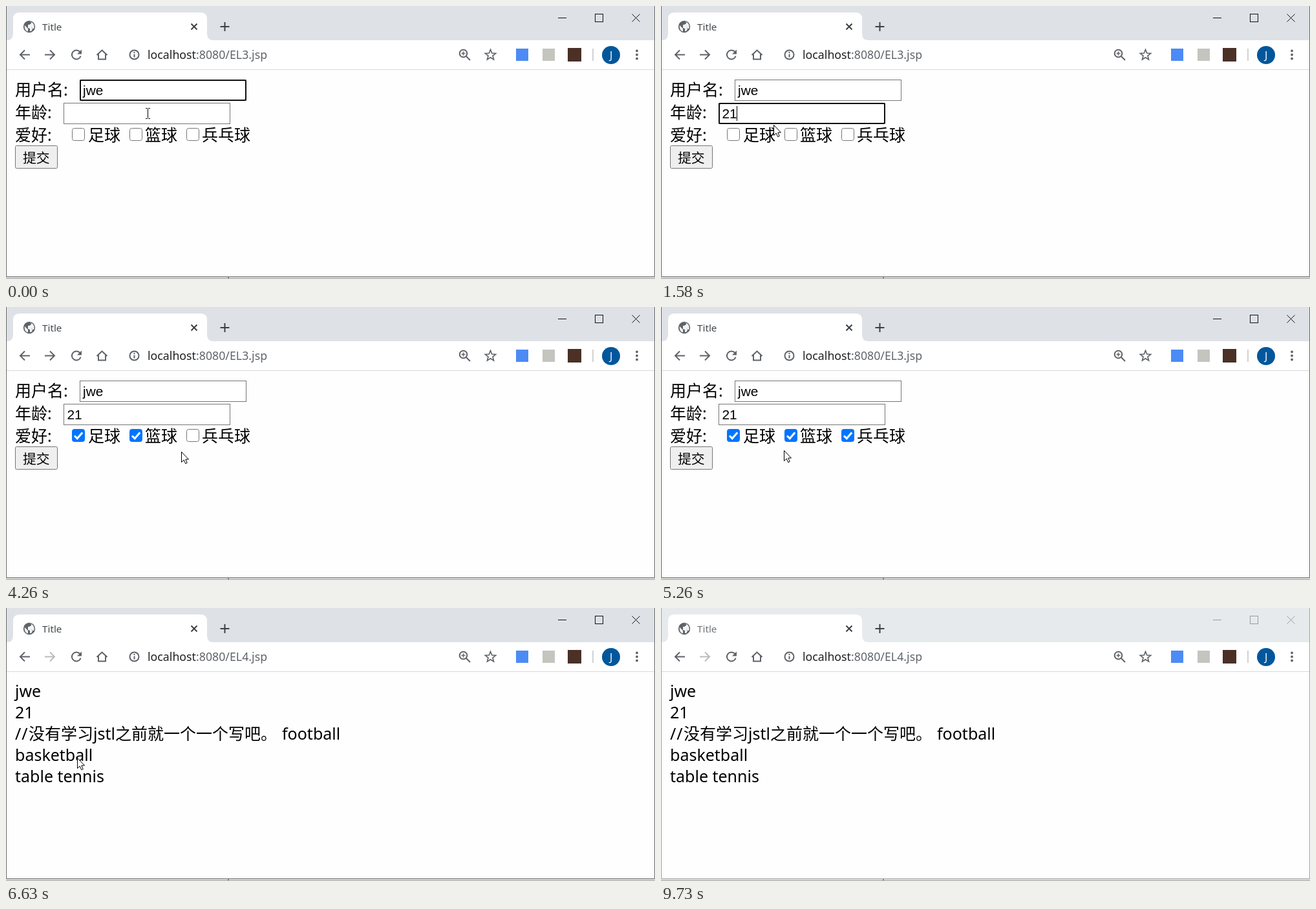
An HTML page for the animation above (9830 ms loop, 1004 by 423 pixels).

```html
<!DOCTYPE html>
<html lang="zh-CN">
<head>
<meta charset="utf-8">
<title>Form demo</title>
<style>
html, body { margin: 0; width: 100%; height: 100%; overflow: hidden; background: #fff; }
svg { display: block; width: 1004px; height: 423px; }
text { font-family: "Noto Sans", "Noto Sans CJK SC", "Noto Sans CJK", sans-serif; white-space: pre; }
.page text { font-size: 25px; fill: #000; }
.page .field text { font: 20.83px "Liberation Sans", Arial, sans-serif; }
.field rect { fill: #fff; stroke: #767676; }
.field .ring { fill: none; stroke: #101010; stroke-width: 2; }
.box rect { fill: #fff; stroke: #767676; }
.box.hover rect { stroke: #4f4f4f; }
.box path { fill: none; stroke: #fff; stroke-width: 3; visibility: hidden; }
.box.on rect { fill: #0075ff; stroke: #0075ff; }
.box.on.hover rect { fill: #005cc8; stroke: #005cc8; }
.box.on path { visibility: visible; }
#submit rect { fill: #efefef; stroke: #767676; }
#submit.hover rect { fill: #e5e5e5; stroke: #4f4f4f; }
#submit.down rect { fill: #f5f5f5; stroke: #8d8d8d; }
.page #submit text { font-size: 20.83px; }
.page #popup text { font-size: 16px; }
#popup rect { fill: #fff; filter: drop-shadow(0 1px 1px rgba(0, 0, 0, .35)); }
.icon { fill: none; stroke: #5f6368; stroke-width: 2; }
.solid { fill: #5f6368; stroke: none; }
#strip { fill: #dee1e6; }
#tabTitle { font-size: 15.25px; fill: #45494d; }
#url { font-size: 17.75px; fill: #5f6368; }
#url tspan { fill: #202124; }
#winButtons { fill: none; stroke: #111; stroke-width: 1; }
#frame { fill: none; stroke: #686868; }
.idle #strip { fill: #e7eaed; }
.idle #tabTitle { fill: #72767a; }
.idle #winButtons { stroke: #999; }
.idle #frame { stroke: #a2a2a2; }
.nav #forward { stroke: #b9bbbe; }
</style>
</head>
<body>
<svg id="stage" viewBox="0 0 1004 423">
  <rect width="1004" height="423" fill="#fefefe"/>

  <!-- tab strip -->
  <rect id="strip" width="1004" height="53"/>
  <path d="M1 53Q11 53 11 43V20Q11 10 21 10H301Q311 10 311 20V43Q311 53 321 53Z" fill="#fff"/>
  <g id="globe">
    <circle class="solid" cx="36" cy="32" r="9.2"/>
    <path fill="#fff" d="M29 30L34 35V39.5Q28.500 38 28.700 31ZM36 24.600H39V27L36 29H34V32H39L41 35H43Q45 30 41 26L39 25ZM34 32V34L37 35V39H39L41 36L39 32Z" opacity=".92"/>
  </g>
  <rect id="spinner" class="solid" x="34" y="22" width="3" height="2" opacity=".75"/>
  <text id="tabTitle" x="56" y="38"></text>
  <path class="icon" d="M286.500 27.500l9 9m0-9l-9 9" style="stroke:#3c4043"/>
  <path class="icon" d="M338.500 25v14m-7-7h14" style="stroke:#3c4043"/>
  <g id="winButtons">
    <path d="M854 18.500h13M968.500 12.500l12 12m0-12l-12 12"/>
    <rect x="911.500" y="12.500" width="12" height="12"/>
  </g>

  <!-- toolbar -->
  <rect y="53" width="1004" height="45" fill="#fff"/>
  <rect y="98" width="1004" height="1" fill="#d8dadd"/>
  <path class="icon" d="M37 75.500H22m7-7l-7 7l7 7"/>
  <path id="forward" class="icon" d="M60 75.500h15m-7-7l7 7l-7 7"/>
  <g id="reload">
    <path class="icon" d="M114.300 71A7 7 0 1 0 115.600 77.500"/>
    <path class="solid" d="M117 67.500V74.500H110Z"/>
  </g>
  <path id="stop" class="icon" d="M102 69l13 13m0-13l-13 13"/>
  <path class="icon" d="M140.500 76L148.500 68.500L156.500 76M143 74.500V82.500H154V74.500"/>
  <circle class="icon" cx="198.500" cy="75.500" r="7" stroke-width="1.800"/>
  <path class="icon" d="M198.500 74.500v5m0-8.500v2"/>
  <text id="url" x="219" y="82"><tspan>localhost</tspan><tspan id="path" style="fill:inherit"></tspan></text>
  <circle class="icon" cx="707.500" cy="73.500" r="5.800"/>
  <path class="icon" d="M711.500 77.500l6.500 6.500"/>
  <path class="icon" d="M704.500 73.500h6m-3-3v6" style="stroke-width:1.500"/>
  <path class="icon" id="star" style="stroke-width:1.700"/>
  <rect x="789" y="66" width="19" height="19" fill="#4c8bf5"/>
  <rect x="830" y="66" width="19" height="19" fill="#c4c5bf"/>
  <rect x="869" y="65" width="21" height="21" fill="#4b3026"/>
  <rect x="907" y="66" width="2" height="19" fill="#d0d2d5"/>
  <circle cx="936" cy="76" r="14" fill="#01579b"/>
  <text x="936" y="81.500" font-size="15.500" fill="#fff" text-anchor="middle">J</text>
  <g class="solid">
    <circle cx="976" cy="69.500" r="1.900"/><circle cx="976" cy="75.500" r="1.900"/><circle cx="976" cy="81.500" r="1.900"/>
  </g>

  <!-- form page -->
  <g id="form" class="page">
    <text x="14" y="139">用户名:</text>
    <text x="14" y="174">年龄:</text>
    <text x="14" y="209">爱好:</text>
    <g class="field">
      <rect x="114.500" y="114.500" width="257" height="32"/>
      <rect id="nameRing" class="ring" x="115" y="115" width="256" height="31" rx="2"/>
      <text x="119" y="138">jwe</text>
    </g>
    <g class="field">
      <rect x="89.500" y="150.500" width="257" height="32"/>
      <rect id="ageRing" class="ring" x="90" y="151" width="256" height="31" rx="2"/>
      <text id="age" x="94.500" y="173.500"></text>
    </g>
    <rect id="caret" y="155" width="1" height="23"/>
    <g id="boxes"></g>
    <g id="submit">
      <rect x="14.500" y="216.500" width="65" height="35" rx="2"/>
      <text x="26" y="243">提交</text>
    </g>
    <g id="popup">
      <rect x="89" y="184" width="258" height="65" rx="2"/>
      <text x="105" y="222">21</text>
    </g>
  </g>

  <!-- result page -->
  <g id="result" class="page">
    <text x="14" y="138">jwe</text>
    <text x="14" y="171">21</text>
    <text y="204"><tspan x="14" letter-spacing="1">//</tspan><tspan x="35">没有学习</tspan><tspan x="135">jstl</tspan><tspan x="169">之前就一个一个写吧。</tspan><tspan x="427">football</tspan></text>
    <text x="14" y="237">basketball</text>
    <text x="14" y="270">table tennis</text>
  </g>

  <!-- window edge -->
  <rect y="420" width="1004" height="3" fill="#dcdcdc"/>
  <rect y="422" width="1004" height="1" fill="#a9a9a9"/>
  <rect x="343" y="420" width="2" height="2" fill="#8a8a8a"/>
  <path id="frame" d="M.5 0V419.500H1003.500V0"/>

  <path id="beam" d="M216 158.500h2.500l1 1l1-1h2.500M219.500 159v14M216 174.500h2.500l1-1l1 1h2.500" fill="none" stroke="#000"/>
  <path id="arrow" d="M.5 .5V16.500L4.200 13L6.700 18.700L9.200 17.600L6.800 12H11.500Z" fill="#fff" stroke="#000"/>
</svg>
<script>
const LOOP = 9830;
const $ = id => document.getElementById(id);
const show = (id, on) => $(id).setAttribute('visibility', on ? 'inherit' : 'hidden');
const between = (t, a, b) => t >= a && t < b;
const inside = ([x, y], l, top, w, h) => between(x, l, l + w) && between(y, top, top + h);

// Pointer strokes: first and last step time, then one position per step
const strokes = [
  [1580, 2570, '174,184 160,188 140,193 122,197 112,198 112,198 130,198 168,197'],
  [2690, 3690, '180,199 195,203 204,204 203,202 203,202 240,206 280,206 300,205'],
  [3840, 4810, '292,210 170,230 95,235 271,224 280,212 286,204 288,200 288,199'],
  [4960, 5650, '288,199 265,206 190,222 115,236 75,240 65,237'],
  [6630, 6900, '110,232 210,210 279,197'],
  [7300, 8300, '290,190 305,160 318,130 328,112 334,105 355,103 390,100 417,100'],
  [8440, 8440, '421,99'],
  [8720, 8990, '480,150 570,250 652,329']
].map(([from, to, path]) => ({ from, to, pts: path.split(' ').map(p => p.split(',').map(Number)) }));

function pointer(t) {
  const s = strokes.filter(s => s.from <= t).pop();
  if (!s) return [219, 166];
  const last = s.pts.length - 1;
  const step = last ? (t - s.from) / (s.to - s.from) * last + .05 : 0;
  return s.pts[Math.min(last, Math.floor(step))];
}

const boxes = [[102, 127, '足球', 2285], [191, 215, '篮球', 3258], [279, 303, '兵乓球', 4960]]
  .map(([x, labelX, label, at]) => {
    $('boxes').insertAdjacentHTML('beforeend',
      `<g class="box"><rect x="${x + .5}" y="189.500" width="19" height="19" rx="3"/>
       <path d="M${x + 4} 199.500l4.200 4.200l8-9.200"/></g><text x="${labelX}" y="209">${label}</text>`);
    return { x, at, el: $('boxes').querySelector('.box:last-of-type') };
  });

const star = Array.from({ length: 10 }, (_, i) => {
  const r = i % 2 ? 3.700 : 8.500, a = (i * 36 - 90) * Math.PI / 180;
  return (749.500 + r * Math.cos(a)).toFixed(1) + ' ' + (76 + r * Math.sin(a)).toFixed(1);
});
$('star').setAttribute('d', 'M' + star.join('L') + 'Z');

function draw(t) {
  const pos = pointer(t);
  const loading = between(t, 6095, 6230), done = t >= 6230, nav = t >= 6095;

  $('stage').setAttribute('class', (nav ? 'nav ' : '') + (t >= 9730 ? 'idle' : ''));
  $('tabTitle').textContent = loading ? 'localhost:8080/EL4.jsp' : 'Title';
  $('path').textContent = ':8080/' + (nav ? 'EL4' : 'EL3') + '.jsp';
  show('globe', !loading);
  show('reload', !loading);
  show('spinner', loading);
  show('stop', loading);
  show('form', !done);
  show('result', done);

  const typed = t < 1020 ? '' : t < 1170 ? '2' : '21';
  const ageFocus = between(t, 120, boxes[0].at);
  $('age').textContent = typed;
  show('nameRing', t < 120);
  show('ageRing', ageFocus);
  show('popup', between(t, 280, 1170));
  $('caret').setAttribute('x', 95 + typed.length * 11);
  show('caret', ageFocus && !between(t, 710, 1020) && !between(t, 1720, 2145));

  for (const b of boxes) {
    b.el.classList.toggle('on', t >= b.at);
    b.el.classList.toggle('hover', t >= 1580 && inside(pos, b.x, 189, 20, 20));
  }
  $('submit').classList.toggle('hover', inside(pos, 14, 216, 66, 36));
  $('submit').classList.toggle('down', between(t, 5960, 6095));

  show('beam', t < 1580);
  show('arrow', between(t, 1580, 9730));
  $('arrow').setAttribute('transform', `translate(${pos[0]} ${pos[1]})`);
}

const start = performance.now();
function tick() {
  draw((performance.now() - start) % LOOP);
  requestAnimationFrame(tick);
}
tick();
</script>
</body>
</html>
```
